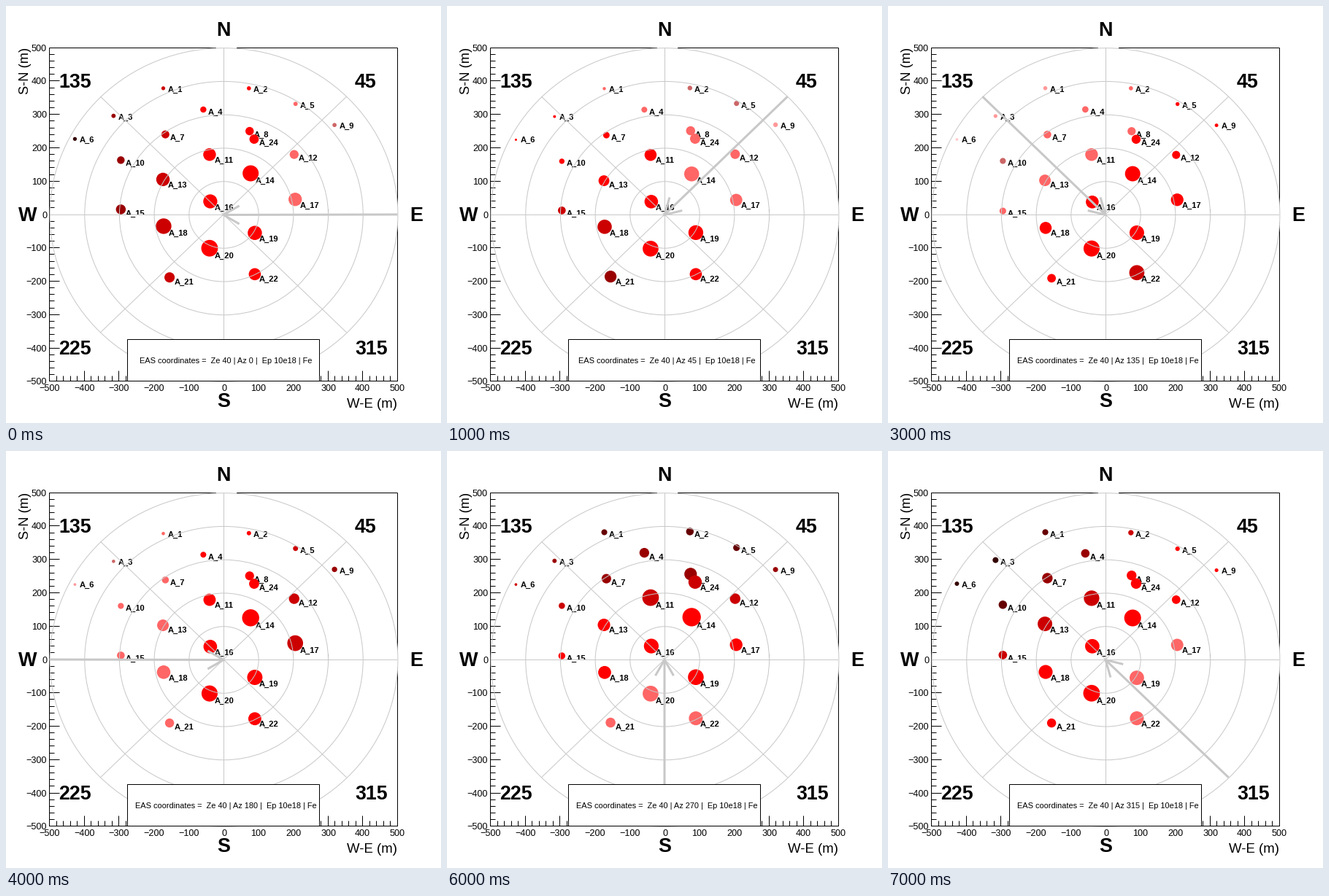
Recreate the animation shown at these times as a matplotlib script. Size 596x572 px, loop 8 s.

```python
import numpy as np
import matplotlib.pyplot as plt
from matplotlib.animation import FuncAnimation
from matplotlib.patches import Circle, Ellipse, Rectangle

W, H, DPI = 596, 572, 100
CX, CY = W / 2, H / 2              # array centre in pixels
SX, SY = 0.8 * W / 1000, 0.8 * H / 1000   # pixels per metre
PX = 72 / DPI                      # points per pixel
GREY = "#c8c8c8"
AZIMUTHS = np.arange(0, 360, 45)

plt.rcParams["font.family"] = "Liberation Sans"

# Station positions in metres, west-east and south-north
NAMES = [f"A_{n}" for n in (*range(1, 23), 24)]
EAST, NORTH = np.array([
    (-173, 379), (73, 380), (-316, 295), (-58, 316), (207, 333), (-427, 225),
    (-167, 240), (75, 252), (319, 269), (-295, 161), (-40, 181), (203, 181),
    (-174, 103), (78, 124), (-295, 12), (-38, 39), (206, 45), (-172, -38),
    (90, -54), (-40, -102), (-155, -189), (90, -177), (88, 228)]).T

# Dots fade from dark (late arrival) to pale (early arrival)
SHADES = ["#330000", "#660000", "#990000", "#cc0000", "#ff0000",
          "#ff6666", "#cc6666", "#ff9999", "#ffcccc"]
LIMITS = [*(-146.5 - 86.8 * np.arange(3, -1, -1)), 100, 300, 386, 450]


def along_axis(az):
    a = np.radians(az)
    return EAST * np.cos(a) + NORTH * np.sin(a)


def dot_sizes(az):
    """Signal size from the distance to the tilted shower axis."""
    p = along_axis(az)
    dist = np.sqrt((EAST - 12) ** 2 + NORTH ** 2 - 0.35 * p ** 2)
    size = np.minimum(7.5 + dist / 30, 23 * np.exp(-dist / 203) - 0.6)
    return size * (1 - 0.0004 * p - 0.05 * np.sin(np.radians(az)))


SIZES = np.array([dot_sizes(az) for az in AZIMUTHS])
COLS = CX + SX * EAST
FEET = CY - SY * NORTH + SIZES.mean(axis=0)   # dots stand on a fixed foot

fig = plt.figure(figsize=(W / DPI, H / DPI), dpi=DPI, facecolor="white")
ax = fig.add_axes([0, 0, 1, 1])
ax.set_xlim(0, W)
ax.set_ylim(H, 0)
ax.axis("off")


def line(xs, ys, color="black", width=1.0, z=1):
    return ax.plot(xs, ys, color=color, lw=width * PX, zorder=z, snap=False,
                   solid_capstyle="butt", solid_joinstyle="miter")[0]


def text(x, y, s, size, ha="center", bold=False, z=2, **kw):
    return ax.text(x, y, s, fontsize=size * PX, ha=ha, va="baseline",
                   weight="bold" if bold else "normal", zorder=z, **kw)


def polar(radius, azimuth):
    a = np.radians(azimuth)
    return CX + SX * radius * np.cos(a), CY - SY * radius * np.sin(a)


def draw_frame():
    left, right, top, bottom = 59.5, 536.5, 57.5, 514.5
    line([left, left], [top, bottom + 0.5])
    line([left, right], [bottom, bottom])
    line([left, 288], [top, top])
    line([316, right], [top, top])
    line([right, right], [top, 275])
    line([right, right], [297, bottom + 0.5])
    for v in range(-500, 501, 20):
        major = v % 100 == 0
        x, y = int(CX + SX * v) + 0.5, int(CY - SY * v) + 0.5
        size = 14 if major else 7
        line([left, left + size], [y, y])
        line([x, x], [bottom, bottom - size])
        if major:
            label = str(v).replace("-", "\u2212")
            text(56, y + 4.5, label, 12.6, ha="right")
            text(x, 527.7, label, 12.6)
    text(536, 551, "W-E (m)", 18.7, ha="right")
    text(31.3, 57, "S-N (m)", 18.3, ha="right", rotation=90,
         rotation_mode="anchor")
    line([441.5, 441.5], [279, 284])


def draw_grid():
    for r in range(100, 501, 100):
        ax.add_patch(Ellipse((CX + 0.5, CY + 0.5), 2 * SX * r, 2 * SY * r,
                             fill=False, ec=GREY, lw=PX, zorder=5))
    for az in (45, 135):
        (x0, y0), (x1, y1) = polar(500, az), polar(500, az + 180)
        line([x0, x1], [y0, y1], GREY, 1, 5)
    line([60, 536], [CY + 1.5, CY + 1.5], "white", 2, 2.5)
    line([60, 536], [CY + 0.5, CY + 0.5], GREY, 1, 5)
    line([CX + 0.5, CX + 0.5], [58, 514], GREY, 1, 5)


def draw_directions():
    for s, x, y in (("N", CX, 41), ("S", CX, 550.5),
                    ("W", 29.7, 295.3), ("E", 561.7, 295.3)):
        text(x, y, s, 27, bold=True, z=6)
    for s, x, y in (("135", 72, 112.3), ("45", 478, 112.3),
                    ("225", 72, 478.3), ("315", 478, 478.3)):
        text(x, y, s, 26.8, ha="left", bold=True, z=6)


draw_frame()
draw_grid()
draw_directions()

dots = []
for name, x, foot in zip(NAMES, COLS, FEET):
    text(x + 6.3, foot + 2.2, name, 11.1, ha="left", bold=True)
    dots.append(ax.add_patch(Circle((x, foot), 1, lw=0, zorder=3)))

shaft = line([], [], GREY, 3, 7)
head = line([], [], GREY, 3, 7)
ax.add_patch(Rectangle((166.5, 457.5), 263, 57, fc="white", ec="black",
                       lw=PX, snap=False, zorder=8))
caption = text(301, 490.3, "", 11.05, z=9)


def update(i):
    az = AZIMUTHS[i]
    levels = np.searchsorted(LIMITS, along_axis(az))
    for dot, x, foot, r, level in zip(dots, COLS, FEET, SIZES[i], levels):
        dot.set_center((x, foot - r))
        dot.set_radius(r)
        dot.set_facecolor(SHADES[level])

    x0, y0 = polar(500, az)
    tip_y = CY + 0.5
    shaft.set_data([x0, CX], [y0, tip_y])
    wings = np.arctan2(y0 - CY, x0 - CX) + np.radians([-30, 30])
    wx, wy = CX + 25 * np.cos(wings), tip_y + 25 * np.sin(wings)
    head.set_data([wx[0], CX, wx[1]], [wy[0], tip_y, wy[1]])
    caption.set_text(f"EAS coordinates =  Ze 40 | Az {az} |  Ep 10e18 | Fe")
    return [*dots, shaft, head, caption]


anim = FuncAnimation(fig, update, frames=len(AZIMUTHS), interval=1000,
                     repeat=True, repeat_delay=0, blit=False)
plt.show()
```
